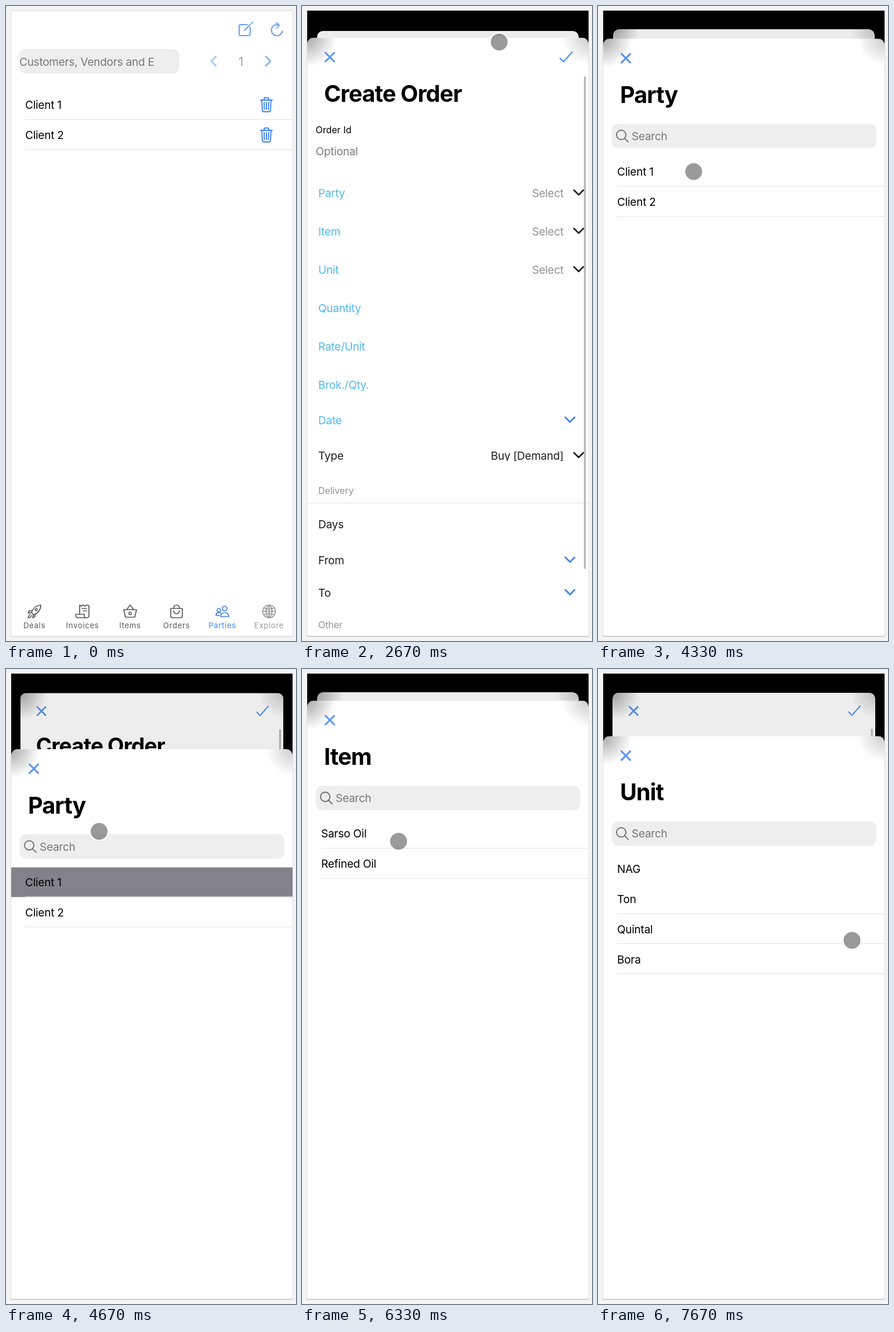
Write an HTML page with a canvas that moves like this. It is 500x1093 px and loops after 8000 ms.

```html
<!DOCTYPE html>
<html lang="en">
<head>
<meta charset="utf-8">
<title>Create order</title>
<style>
  html, body { margin: 0; width: 100%; height: 100%; overflow: hidden; background: #f4f4f4; }
  canvas { display: block; width: 500px; height: 1093px; }
</style>
</head>
<body>
<canvas id="stage" width="500" height="1093"></canvas>
<script>
const ctx = document.getElementById('stage').getContext('2d');
const LOOP = 8000, STEP = 1000 / 3, SLIDE = 400;
const LEFT = 9, RIGHT = 494, TOP = 8, BOTTOM = 1085, MID = 251.5, SHEET_TOP = 54.5;
const BLUE = '#3f82ee', LABEL = '#53b9ec', INK = '#1d1d1f', GREY = '#929292';

// Icons are centred on the origin.
const ICONS = {
  rocket: 'M-5 2C-3 -5 2 -10 11 -11C11 -3 6 3 -1 6ZM-4 -1H-9L-11 3L-5 2M1 5V9L-3 11L-2 6M-7 5C-10 6 -10 9 -11 11C-8 11 -6 10 -5 7M3 -5a2 2 0 1 0 .1 0',
  receipt: 'M-5 5V-11L-2 -9L1 -11L4 -9L7 -11L11 -10V7Q11 11 7 11H-8Q-12 11 -12 5H3V8Q3 11 7 11M-1 -5H7M1 -1H7',
  basket: 'M-11 -3H11L8 10H-8ZM-6 -3L0 -11L6 -3M0 1a2.3 2.3 0 1 0 .1 0',
  bag: 'M-10 -5H10V8Q10 11 7 11H-7Q-10 11 -10 8ZM-5 -5V-6A5 5 0 0 1 5 -6V-5M-5 -1A5 5 0 0 0 5 -1',
  people: 'M4 -9a4 4 0 1 0 .1 0M-6 -5a3 3 0 1 0 .1 0M-3 9C-3 0 11 0 11 9ZM-11 7C-11 2 -6 1 -3 3M-11 7H-5',
  globe: 'M0 -11a11 11 0 1 0 .1 0M0 -11V11M-11 0H11M0 -11C-7 -5 -7 5 0 11C7 5 7 -5 0 -11M-9 -6Q0 -2 9 -6M-9 6Q0 2 9 6',
  trash: 'M-8 -8L-7 9Q-7 12 -4 12H4Q7 12 7 9L8 -8M-10 -8H10M-4 -8V-10Q-4 -12 -2 -12H2Q4 -12 4 -10V-8M0 -4V8M-4 -4L-3.5 8M4 -4L3.5 8',
  compose: 'M3 -8H-8Q-11 -8 -11 -5V8Q-11 11 -8 11H5Q8 11 8 8V-3M-2 2L8 -8M10 -10L12 -12',
  refresh: 'M4 -8A9.5 9.5 0 1 0 9.5 2M-1 -12L4 -8L0 -3',
  filter: 'M-16 -8H16M-10 0H10M-4 8H4',
  checkbox: 'M-9 -12H9Q12 -12 12 -9V9Q12 12 9 12H-9Q-12 12 -12 9V-9Q-12 -12 -9 -12M-6 1L-2 5L6 -5',
  search: 'M-2 -10a8 8 0 1 0 .1 0M4 4L10 10',
  left: 'M4 -8L-4 0L4 8',
  right: 'M-4 -8L4 0L-4 8',
  down: 'M-8 -4L0 4L8 -4',
  close: 'M-7.5 -7.5L7.5 7.5M7.5 -7.5L-7.5 7.5',
  check: 'M-10 2L-4 8L11 -9'
};
for (const name in ICONS) ICONS[name] = new Path2D(ICONS[name]);

const TABS = [
  ['Deals', 'rocket', 49], ['Invoices', 'receipt', 132], ['Items', 'basket', 214],
  ['Orders', 'bag', 294], ['Parties', 'people', 373], ['Explore', 'globe', 453.5]
];

const CREATE = { open: 2269 };
const PICKERS = [
  { title: 'Party', rows: ['Client 1', 'Client 2'], open: 3985, close: 4653 },
  { title: 'Item', rows: ['Sarso Oil', 'Refined Oil'], open: 5660, close: 6580 },
  { title: 'Unit', rows: ['NAG', 'Ton', 'Quintal', 'Bora'], open: 7485, close: Infinity }
];

// Pointer stops: step, x, y
const POINTER = [
  [1, 262, 1009], [2, 290, 1055], [3, 294, 1058], [4, 294, 1058], [5, 297, 1055],
  [6, 365, 46], [7, 358, 52], [8, 340, 62], [9, 207, 242], [10, 200, 266],
  [11, 393, 314], [12, 393, 318], [13, 165, 285], [14, 160.5, 279.5], [16, 400, 385],
  [17, 405, 388], [18, 190, 305], [19, 166.5, 296.5], [20, 166, 293], [22, 436, 456], [23, 438, 467]
];

function ease(x) {
  if (x <= 0) return 0;
  if (x >= 1) return 1;
  const curve = (a, b, s) => 3 * (1 - s) ** 2 * s * a + 3 * (1 - s) * s * s * b + s ** 3;
  let lo = 0, hi = 1;
  for (let i = 0; i < 24; i++) {
    const s = (lo + hi) / 2;
    if (curve(.32, 0, s) < x) lo = s; else hi = s;
  }
  return curve(.72, 1, lo);
}

function shown(sheet, t) {
  return t < (sheet.close ?? Infinity) ? ease((t - sheet.open) / SLIDE) : 1 - ease((t - sheet.close) / SLIDE);
}

function text(str, x, y, { size = 19, color = INK, align = 'left', weight = 400, gap = -.25 } = {}) {
  ctx.font = `${weight} ${size}px Inter, sans-serif`;
  ctx.letterSpacing = gap + 'px';
  ctx.textAlign = align;
  ctx.fillStyle = color;
  ctx.fillText(str, x, y + size * .364);
}

function icon(name, x, y, color = BLUE, width = 2) {
  ctx.save();
  ctx.translate(x, y);
  ctx.strokeStyle = color;
  ctx.lineWidth = width;
  ctx.lineCap = ctx.lineJoin = 'round';
  ctx.stroke(ICONS[name]);
  ctx.restore();
}

function box(x, y, w, h, color, radius = 0) {
  ctx.fillStyle = color;
  ctx.beginPath();
  ctx.roundRect(x, y, w, h, radius);
  ctx.fill();
}

function disc(x, y, r, color) {
  ctx.fillStyle = color;
  ctx.beginPath();
  ctx.arc(x, y, r, 0, 7);
  ctx.fill();
}

function line(x, y, color = '#e3e3e3') { box(x, y, RIGHT - x, 1, color); }

function drawToolbar(orders) {
  const soft = '#69a0f3';
  if (orders) {
    icon('filter', 318, 39, BLUE, 2.4);
    icon('checkbox', 420, 39, soft, 2.2);
  }
  icon('compose', orders ? 364 : 413, 40, soft);
  icon('refresh', 467, 41, soft);
  box(23, 74, 276, 42, '#eeeeee', 11);
  if (orders) {
    icon('search', 115, 95.5, '#8f8f8f', 1.8);
    text('Orders', 132, 96, { color: '#9a9a9a' });
  } else {
    text('Customers, Vendors and E', 23, 96, { color: '#777' });
  }
  icon('left', 358, 95, orders ? '#c6dafb' : '#a3c4f8', 2.6);
  icon('right', 452, 95, orders ? '#c6dafb' : '#83aff4', 2.6);
  text('1', 405, 96, { color: orders ? '#b8b8b8' : '#999', align: 'center', size: 20 });
}

function drawApp(t) {
  const orders = t > 1300;
  box(LEFT, TOP, RIGHT - LEFT, BOTTOM - TOP, '#fff');
  drawToolbar(orders);
  if (!orders) {
    PICKERS[0].rows.forEach((name, i) => {
      const y = 170 + 52 * i;
      text(name, 33, y, { color: '#000' });
      icon('trash', 449, y, BLUE, 1.9);
      line(33, y + 25);
    });
  }
  if (t > 980 && !orders) disc(294, 1058, 34, '#d9e4fc');
  if (orders && t < 1600) disc(294, 1052, 39.5, '#d9e4fc');
  const active = orders ? 'Orders' : 'Parties';
  for (const [name, glyph, x] of TABS) {
    const color = name === active ? BLUE : name === 'Explore' ? '#9a9a9a' : '#58595c';
    icon(glyph, x, 1042, color, 1.7);
    text(name, x, 1066, { size: 13.2, color, align: 'center', gap: .65 });
  }
  if (orders && t < 1600) {
    box(LEFT, 1053, 159, 32, 'rgba(183,229,223,.6)', [0, 7, 0, 0]);
    text('Waiting for bu...', 17, 1070, { size: 18, color: 'rgba(140,160,162,.8)', gap: 0 });
  }
}

function corner(x, y, r, strength) {
  const g = ctx.createRadialGradient(x, y, 0, x, y, r);
  g.addColorStop(0, `rgba(0,0,0,${strength})`);
  g.addColorStop(1, 'rgba(0,0,0,0)');
  box(x - r, y, 2 * r, r, g);
}

function sheetBase(title) {
  ctx.beginPath();
  ctx.roundRect(LEFT, SHEET_TOP, RIGHT - LEFT, 1150, 11);
  ctx.clip();
  box(LEFT, SHEET_TOP, RIGHT - LEFT, 1150, '#fff');
  corner(LEFT, SHEET_TOP, 50, .34);
  corner(RIGHT, SHEET_TOP, 46, .2);
  icon('close', 48, 88, '#5d95f3', 3.1);
  text(title, 38, 151, { size: 39.5, weight: 700, color: '#000', gap: -.9 });
}

function drawCreate(t) {
  sheetBase('Create Order');
  icon('check', 455, 88, '#4f8ff4', 2.1);
  text('Order Id', 23.5, 213, { size: 16, color: '#000', gap: 0 });
  text('Optional', 23.5, 250.5, { color: '#7c7c7c' });
  PICKERS.forEach(({ title, rows, close }, i) => {
    const y = 322 + 66 * i, chosen = t >= close;
    text(title, 28, y, { color: LABEL });
    text(chosen ? rows[0] : 'Select', 451, y, { align: 'right', color: chosen ? INK : GREY });
    icon('down', 477, y - 1, INK, 2.6);
  });
  ['Quantity', 'Rate/Unit', 'Brok./Qty.'].forEach((s, i) => text(s, 28, 520 + 66 * i, { color: LABEL }));
  text('Date', 28, 713, { color: LABEL });
  text('Type', 28, 774);
  ctx.save();
  ctx.beginPath();
  ctx.rect(300, 767, 160, 16);
  ctx.clip();
  text('Buy [Demand]', 451, 774, { align: 'right' });
  ctx.restore();
  icon('down', 477, 773, INK, 2.6);
  text('Delivery', 28, 834, { size: 16, color: GREY, gap: -.1 });
  line(LEFT, 855, '#dedede');
  text('Days', 28, 892);
  text('From', 28, 954);
  text('To', 28, 1010);
  text('Other', 28, 1065, { size: 16, color: GREY, gap: -.1 });
  for (const y of [712, 953, 1009]) icon('down', 462, y, BLUE, 2.8);
  box(486, 121, 3.5, 848, '#b9b9b9', 2);
}

function drawPicker({ title, rows, close }, t) {
  sheetBase(title);
  box(23.5, 201, 456.5, 42, '#eeeeee', 11);
  icon('search', 42, 222, '#6d6d6d', 1.8);
  text('Search', 58, 222.5, { color: '#777' });
  if (t >= close) box(LEFT, 258, RIGHT - LEFT, 51, '#83828a');
  rows.forEach((name, i) => {
    const y = 283.5 + 51.7 * i;
    if (i || rows.length < 4) line(33, Math.round(y + 24.5));
    text(name, 33, y, { color: '#000' });
  });
}

// Pushes a layer back behind the sheet above it by amount p.
function recede(p, from, to, draw) {
  const scale = 1 - .07 * p;
  ctx.save();
  ctx.translate(MID, from + (to - from) * p);
  ctx.scale(scale, scale);
  ctx.translate(-MID, -from);
  if (p) {
    ctx.beginPath();
    ctx.roundRect(LEFT, from, RIGHT - LEFT, 1150, 11 * p);
    ctx.clip();
  }
  draw();
  if (p) box(LEFT, from, RIGHT - LEFT, 1150, `rgba(0,0,0,${.075 * p})`);
  ctx.restore();
}

function rise(p, draw) {
  ctx.save();
  ctx.translate(0, (1 - p) * (BOTTOM - SHEET_TOP));
  draw();
  ctx.restore();
}

function drawPointer(step) {
  if (step < 1) return;
  const next = POINTER.findIndex(p => p[0] >= step);
  const b = POINTER[next], a = POINTER[Math.max(0, next - 1)];
  const f = b === a ? 1 : (step - a[0]) / (b[0] - a[0]);
  const x = a[1] + (b[1] - a[1]) * f, y = a[2] + (b[2] - a[2]) * f;
  const pressed = step === 3 || step === 4;
  const r = step === 1 ? 10.5 : 14.5;
  ctx.strokeStyle = 'rgba(255,255,255,.85)';
  ctx.lineWidth = 2.5;
  ctx.beginPath();
  ctx.arc(x, y, r + 1, 0, 7);
  ctx.stroke();
  disc(x, y, r, pressed ? 'rgba(50,55,70,.72)' : 'rgba(120,120,120,.75)');
}

function render(step) {
  const t = step * STEP;
  ctx.clearRect(0, 0, 500, 1093);
  box(0, 0, 500, 1093, '#f4f4f4');
  box(LEFT - 1, TOP - 1, RIGHT - LEFT + 2, BOTTOM - TOP + 2, '#dedede');
  ctx.save();
  ctx.beginPath();
  ctx.rect(LEFT, TOP, RIGHT - LEFT, BOTTOM - TOP);
  ctx.clip();
  const created = shown(CREATE, t);
  if (created) box(LEFT, TOP, RIGHT - LEFT, BOTTOM - TOP, '#000');
  recede(created, TOP, 43, () => drawApp(t));
  if (created) {
    const picker = PICKERS.find(p => shown(p, t) > 0);
    const depth = picker ? shown(picker, t) : 0;
    rise(created, () => recede(depth, SHEET_TOP, 40, () => drawCreate(t)));
    if (picker) rise(depth, () => drawPicker(picker, t));
  }
  drawPointer(step);
  ctx.restore();
  box(LEFT, BOTTOM - .5, RIGHT - LEFT, 1, created ? '#b4b4b4' : '#d4d4d4');
}

function tick() {
  const t = performance.now() % LOOP;
  render(Math.floor((t + 4) / STEP) % 24);
  requestAnimationFrame(tick);
}
tick();
</script>
</body>
</html>
```
